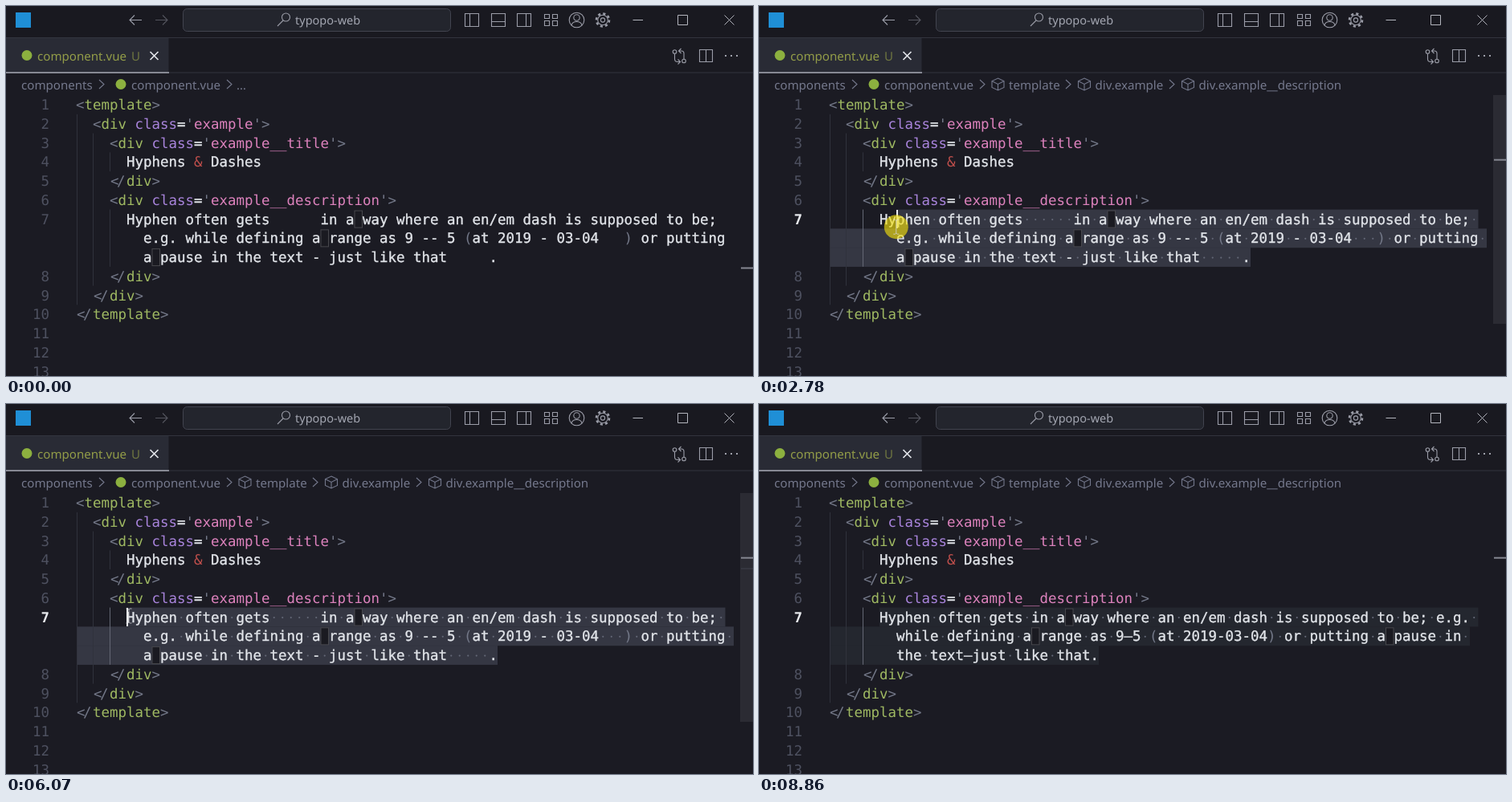
An HTML page that plays this animation: 930x461 px, repeating every 8.99 s.

```html
<!DOCTYPE html>
<html lang="en">
<head>
<meta charset="utf-8">
<title>Fixing typos in an editor</title>
<style>
  html, body { margin: 0; width: 100%; height: 100%; overflow: hidden; background: #1b1b23; }
  svg { display: block; width: 100vw; height: 100vh; }
  text { white-space: pre; text-rendering: geometricPrecision; }
  .ui { font: 15.1px "Noto Sans", "Open Sans", sans-serif; fill: #74788c; }
  #palette { font-size: 15.2px; }
  .code { font: 17.44px "DejaVu Sans Mono", "Noto Sans Mono", monospace; }
  .p { fill: #747989; }
  .amp { fill: #c04f4c; }
  .kw { fill: #a984dc; }
  .tag { fill: #9fb962; }
  .str { fill: #dd82bd; }
  .word { fill: #e2e5ea; stroke: #e2e5ea; stroke-width: .35; }
  .num { fill: #4e5160; text-anchor: end; }
  .num.on { fill: #e8eaee; font-weight: 700; }
  .line { fill: none; stroke: #9b9da8; stroke-width: 1.1; }
  .crumb { fill: none; stroke: #74788c; stroke-width: 1.1; }
  .guide { stroke: #30323c; }
  .guide.on { stroke: #646774; }
  .nbsp { fill: #1a1a21; stroke: #47474c; }
  .dot { fill: #636776; }
  .item { fill: #9093a0; }
  .key { font-size: 13px; fill: #c3c5cd; text-anchor: middle; }
  .cap { fill: #181920; stroke: #2d2f39; }
  .off { display: none; }
</style>
</head>
<body>
<svg viewBox="0 0 930 461" preserveAspectRatio="none">
  <defs>
    <clipPath id="selClip"></clipPath>
    <clipPath id="listClip"><rect x="177" y="50" width="578" height="238"/></clipPath>
    <filter id="shade" x="-10%" y="-10%" width="120%" height="125%">
      <feDropShadow dx="0" dy="2" stdDeviation="4" flood-color="#000" flood-opacity=".55"/>
    </filter>
    <path id="cube" class="crumb" d="M0-7.5 7.5-4V4L0 7.5-7.5 4V-4ZM-7.5-4 0 0 7.5-4M0 0V7.5"/>
    <path id="chev" class="crumb" d="M-3-5.5 3 0-3 5.5"/>
    <g id="gear" class="line">
      <circle r="2.6"/><circle r="6.3"/>
      <circle r="8" stroke-width="2.6" stroke-dasharray="3.14 3.14"/>
    </g>
  </defs>
  <rect width="930" height="461" fill="#1b1b23"/>

  <g id="editor">
    <rect id="hl" x="88" y="253.6" width="825" height="71.3" fill="#22252d"/>
    <g id="sel"></g>
    <g id="guides"></g>
    <g id="boxes"></g>
    <g id="dots" clip-path="url(#selClip)"></g>
    <g id="code" class="code"></g>
    <rect id="caret" width="2" height="23" fill="#eceef2"/>
    <rect id="slider" x="914" y="111" width="16" height="285" fill="#fff"/>
    <rect id="echo" x="915" y="204.5" width="15" height="1.2" fill="#3c3e49"/>
    <rect id="mark" x="915" width="15" height="2" fill="#858791"/>
  </g>

  <g class="ui">
    <rect width="930" height="39" fill="#191920"/>
    <rect y="39" width="930" height="44" fill="#1a1a21"/>
    <path d="M0 39.5H930M203 83H930" stroke="#32343e"/>
    <rect y="40" width="202.5" height="42" fill="#292b35"/>
    <rect y="82" width="203" height="2" fill="#878994"/>
    <rect x="12" y="8" width="19" height="19" fill="#1f8fd6"/>
    <g id="nav">
      <path class="line" d="M169 17.5H154M160 11.5 154 17.5 160 23.5"/>
      <path class="line" opacity=".45" d="M186 17.5H201M195 11.5 201 17.5 195 23.5"/>
      <rect x="220.5" y="3.5" width="333" height="28" rx="5" fill="#23252d" stroke="#42444f"/>
      <circle class="line" cx="348.5" cy="14" r="5"/>
      <path class="line" d="M345 18 338 25"/>
      <text x="360" y="22.5" font-size="14.5" fill="#a3a6b1">typopo-web</text>
    </g>
    <g class="line">
      <path d="M571.5 9.5H588.5V25.5H571.5ZM577.5 9.5V25.5M604.5 9.5H621.5V25.5H604.5ZM604.5 19.5H621.5M636.5 9.5H653.5V25.5H636.5ZM647.5 9.5V25.5"/>
      <path d="M670.5 10.5H676.5V15.5H670.5ZM670.5 18.5H676.5V24.5H670.5ZM680.5 10.5H686.5V15.5H680.5ZM680.5 18.5H686.5V24.5H680.5Z"/>
      <circle cx="710.5" cy="17.5" r="9.3"/><circle cx="710.5" cy="14.5" r="3.7"/>
      <path d="M704 24Q705 19.5 710.5 19.5T717 24"/>
      <path d="M780.5 17.5H793M836.5 11.5H848.5V23.5H836.5ZM894.5 11.5 906.5 23.5M906.5 11.5 894.5 23.5" stroke="#b4b6be" stroke-width="1"/>
      <circle cx="832.5" cy="57" r="2.3"/><circle cx="844" cy="68.5" r="2.3"/>
      <path d="M832.5 59.5V66Q832.5 69.5 836 69.5H839M836.5 66.5 839.5 69.5 836.5 72.5M844 66V59Q844 56 841 56H838M840.5 53 837.5 56 840.5 59"/>
      <path d="M863.5 54.5H879.5V69.5H863.5ZM871.5 54.5V69.5"/>
    </g>
    <use href="#gear" x="743" y="17.5"/>
    <path d="M895 62H897M902 62H904M909 62H911" stroke="#a0a2ac" stroke-width="2"/>
    <circle cx="26" cy="61.5" r="6.5" fill="#8cb03f"/>
    <text x="39" y="68" fill="#929c48">component.vue</text>
    <text x="156" y="67.5" fill="#6f7641">U</text>
    <path id="close" d="M179.5 57 189.5 67M189.5 57 179.5 67" stroke="#e3e5ea" stroke-width="1.7"/>
    <circle id="dirty" cx="184.5" cy="62" r="5" fill="#e3e5ea"/>

    <text x="19" y="104">components</text>
    <use href="#chev" x="119" y="97.5"/>
    <circle cx="143" cy="97.5" r="6.5" fill="#8cb03f"/>
    <text x="156" y="104">component.vue</text>
    <use href="#chev" x="278" y="97.5"/>
    <text id="short" x="287" y="104">…</text>
    <g id="long">
      <use href="#cube" x="297.5" y="97.5"/><text x="311" y="104">template</text>
      <use href="#chev" x="385" y="97.5"/>
      <use href="#cube" x="405" y="97.5"/><text x="418.5" y="104">div.example</text>
      <use href="#chev" x="514" y="97.5"/>
      <use href="#cube" x="534" y="97.5"/><text x="547.5" y="104">div.example__description</text>
    </g>
  </g>

  <g id="palette" class="ui">
    <rect x="176.5" y="4" width="579" height="284.5" rx="5" fill="#21232b" stroke="#34363f" filter="url(#shade)"/>
    <rect x="185.5" y="15.5" width="556" height="33" fill="#24262f" stroke="#555864"/>
    <text x="194" y="39" fill="#cdd0d7">&gt;</text>
    <rect id="typing" x="203" y="21" width="1.5" height="22" fill="#eceef2"/>
    <rect x="183" y="54" width="566" height="28" rx="3" fill="#2d303a"/>
    <g id="list" clip-path="url(#listClip)"></g>
    <text x="606" y="74" fill="#c3c5cd">recently used</text>
    <use href="#gear" x="719" y="68"/>
  </g>

  <g id="mouse">
    <circle id="press" r="15" fill="#f2df0c" opacity=".64"/>
    <path d="M-3.5-9H-1.5L0-8 1.5-9H3.5M0-8V8M-3.5 9H-1.5L0 8 1.5 9H3.5" fill="none" stroke="#d8d9dd" opacity=".75"/>
  </g>
</svg>

<script>
const LOOP = 8990, CELL = 10.5, ROW = 23.75, TOP = 111.1, LEFT = 87;
const START = [150, 171, 171];
// "~" stands for a no-break space, which the editor outlines
const BEFORE = [
  "Hyphen often gets      in a~way where an en/em dash is supposed to be; ",
  "e.g. while defining a~range as 9 -- 5 (at 2019 - 03-04   ) or putting ",
  "a~pause in the text - just like that     ."
];
const AFTER = [
  "Hyphen often gets in a~way where an en/em dash is supposed to be; e.g. ",
  "while defining a~range as 9–5 (at 2019-03-04) or putting a~pause in ",
  "the text—just like that."
];
const MARKUP = [
  "<template>",
  "  <div class='example'>",
  "    <div class='example__title'>",
  "      Hyphens & Dashes",
  "    </div>",
  "    <div class='example__description'>",
  "", "", "",
  "    </div>",
  "  </div>",
  "</template>"
];
const COMMANDS = [
  "Typopo: Fix Typos", "View: Toggle Minimap", "Git: Close All Diff Editors",
  "Convert Indentation to Spaces", "Preferences: Open User Settings (JSON)",
  "Preferences: Color Theme", "Developer: Inspect Editor Tokens and Scopes",
  "Preferences: Open Keyboard Shortcuts", "Preferences: Open Settings (UI)"
];
const TOKEN = /(?<p><\/?|[>'()])|(?<amp>&)|(?<kw>class)|(?<tag>(?<=<\/?)\w+)|(?<str>(?<=')\w+)|(?<word>[^\s<>'()&~]+)/g;

const $ = id => document.getElementById(id);
const show = (id, on) => $(id).classList.toggle("off", !on);
const rowTop = r => TOP + r * ROW;
const baseline = r => rowTop(r) + 18;

function add(parent, tag, attrs, text) {
  const el = document.createElementNS("http://www.w3.org/2000/svg", tag);
  for (const k in attrs) el.setAttribute(k, attrs[k]);
  if (text) el.textContent = text;
  parent.append(el);
  return el;
}

function writeCode(parent, x, row, str) {
  for (const m of str.matchAll(TOKEN)) {
    const kind = Object.keys(m.groups).find(k => m.groups[k]);
    const tight = m[0] === "</";
    add(parent, "text", {
      class: kind, x: x + m.index * CELL + (tight ? 1 : 0), y: baseline(row),
      "letter-spacing": tight ? -2.5 : 0
    }, m[0]);
  }
}

const addBox = (parent, row, x) =>
  add(parent, "rect", { class: "nbsp", x: x + .5, y: rowTop(row) + 1.5, width: 9.5, height: 21 });

function paragraph(name, rows) {
  const text = add($("code"), "g", { id: name + "Text" });
  const dots = add($("dots"), "g", { id: name + "Dots" });
  const boxes = add($("boxes"), "g", { id: name + "Boxes" });
  rows.forEach((str, i) => {
    writeCode(text, START[i], i + 6, str);
    [...str].forEach((c, n) => {
      const x = START[i] + n * CELL;
      if (c === " ") add(dots, "circle", { class: "dot", cx: x + CELL / 2, cy: rowTop(i + 6) + 12.5, r: 1.1 });
      if (c === "~") addBox(boxes, i + 6, x);
    });
  });
}

MARKUP.forEach((str, r) => writeCode($("code"), LEFT, r, str));
paragraph("before", BEFORE);
paragraph("after", AFTER);
const stale = add($("boxes"), "g", { id: "staleBoxes" });
[432, 391.5, 202.5].forEach((x, i) => addBox(stale, i + 6, x));

const nums = [];
for (let n = 1; n <= 13; n++)
  nums[n] = add($("code"), "text", { class: "num", x: 54, y: baseline(n <= 7 ? n - 1 : n + 1) }, String(n));

const guide = (x, from, to) =>
  add($("guides"), "path", { class: "guide", d: `M${x} ${rowTop(from)}V${rowTop(to + 1)}` });
guide(88.5, 1, 10);
guide(108.5, 2, 9);
guide(129.5, 3, 3);
const innerGuide = guide(129.5, 6, 8);

const selRects = [0, 1, 2].map(i => ["sel", "selClip"].map(id =>
  add($(id), "rect", { y: rowTop(i + 6), height: ROW + .1 })));

function keys(y, caps) {
  caps.forEach(([x, w, label], i) => {
    add($("list"), "rect", { class: "cap", x, y: y - 10, width: w, height: 20, rx: 3 });
    add($("list"), "text", { class: "key", x: x + w / 2, y: y + 4.5 }, label);
    const next = caps[i + 1];
    if (next && label !== "K")
      add($("list"), "text", { class: "key", x: (x + w + next[0]) / 2, y: y + 4.5 }, "+");
  });
}
const itemY = i => 69 + i * 27.45;
COMMANDS.forEach((name, i) => {
  const el = add($("list"), "text", { class: "item", x: 197, y: itemY(i) + 5.3 }, name);
  if (!i) el.style.fill = "#d9dbe1";
});
keys(itemY(0) - .5, [[475.5, 34, "Ctrl"], [527.5, 30, "Alt"], [575.5, 20, "T"]]);
[[5, "T"], [7, "S"]].forEach(([i, last]) =>
  keys(itemY(i), [[567.5, 33, "Ctrl"], [619.5, 20, "K"], [653.5, 33, "Ctrl"], [705.5, 20, last]]));

// Pointer route: time, x, y
const ROUTE = [
  [590, 922, 455], [800, 800, 440], [935, 730, 424], [1140, 636, 340], [1280, 613, 318],
  [1741, 613, 318], [2010, 375, 313], [2220, 208, 298], [2290, 199, 296],
  [2500, 188, 287], [2640, 178, 280], [2850, 160, 268], [3110, 153, 264],
  [7070, 153, 264], [7230, 115, 370], [7390, 100, 423],
  [7880, 100, 423], [8020, 872, 453], [8090, 894, 455]
];
// The pointer moves in steps of about 70 ms: from, to, step
const CLOCKS = [[590, 1280, 69], [1810, 2500, 69], [2570, 3110, 77], [7150, 7390, 80], [7950, 8160, 70]];

function pointer(t) {
  let s = t;
  for (const [from, to, step] of CLOCKS)
    if (t >= from && t < to) s = from + Math.floor((t - from) / step + .01) * step;
  const i = ROUTE.findIndex(p => p[0] > s);
  if (i < 0) return ROUTE[ROUTE.length - 1].slice(1);
  if (!i) return ROUTE[0].slice(1);
  const [a, b] = [ROUTE[i - 1], ROUTE[i]];
  const k = (s - a[0]) / (b[0] - a[0]);
  return [a[1] + (b[1] - a[1]) * k, a[2] + (b[2] - a[2]) * k];
}

const within = (t, ...spans) => spans.some(([a, b]) => t >= a && t < b);
const ramp = (t, from, ms) => Math.min(1, Math.max(0, (t - from) / ms));

function draw(t) {
  const fixed = t >= 6140, rows = fixed ? AFTER : BEFORE;
  const open = within(t, [4520, 6070]);
  const [mx, my] = pointer(t);

  // The caret follows the drag until the button is released
  let row = 0, col = 0;
  if (t < 3110) {
    row = my < rowTop(7) ? 0 : my < rowTop(8) ? 1 : 2;
    col = Math.min(rows[row].length, Math.max(0, Math.round((mx - START[row]) / CELL)));
  }
  const caretX = START[row] + col * CELL;
  selRects.forEach((pair, i) => {
    const from = i === row ? caretX : 88;
    const to = START[i] + rows[i].length * CELL;
    const w = t < 1810 || i < row ? 0 : Math.max(0, to - from);
    pair.forEach(r => { r.setAttribute("x", from); r.setAttribute("width", w); });
  });
  // Without focus the selection is dimmed
  $("sel").setAttribute("fill", open || t >= 8790 ? "#24272f" : "#353743");
  show("hl", within(t, [1610, 1810]));

  for (const part of ["Text", "Dots"]) {
    show("before" + part, !fixed);
    show("after" + part, fixed);
  }
  show("beforeBoxes", !fixed);
  show("staleBoxes", within(t, [6140, 6400]));
  show("afterBoxes", t >= 6400);

  $("caret").setAttribute("x", caretX);
  $("caret").setAttribute("y", rowTop(row + 6) + .4);
  show("caret", within(t, [1610, 3530], [3990, 4520], [6070, 6670], [7150, 7670], [8160, 8720]));
  nums[7].classList.toggle("on", t >= 2640);
  innerGuide.classList.toggle("on", t >= 1610);

  $("mark").setAttribute("y", t < 1610 ? 325.5 : 190.7 + row * 13.4);
  show("echo", within(t, [3110, 8720]));
  $("slider").setAttribute("opacity", .07 * (ramp(t, 590, 400) - ramp(t, 8160, 500)));

  show("short", t < 1950);
  show("long", t >= 1950);
  show("dirty", within(t, [6140, 8860]));
  show("close", !within(t, [6140, 8860]));
  show("nav", !open);
  show("palette", open);
  show("typing", !within(t, [5050, 5590]));

  show("mouse", within(t, [590, 8160]));
  show("press", within(t, [1610, 3380]));
  $("mouse").setAttribute("transform", `translate(${mx} ${my})`);
}

const begin = performance.now();
function tick() {
  draw((performance.now() - begin) % LOOP);
  requestAnimationFrame(tick);
}
tick();
</script>
</body>
</html>
```
